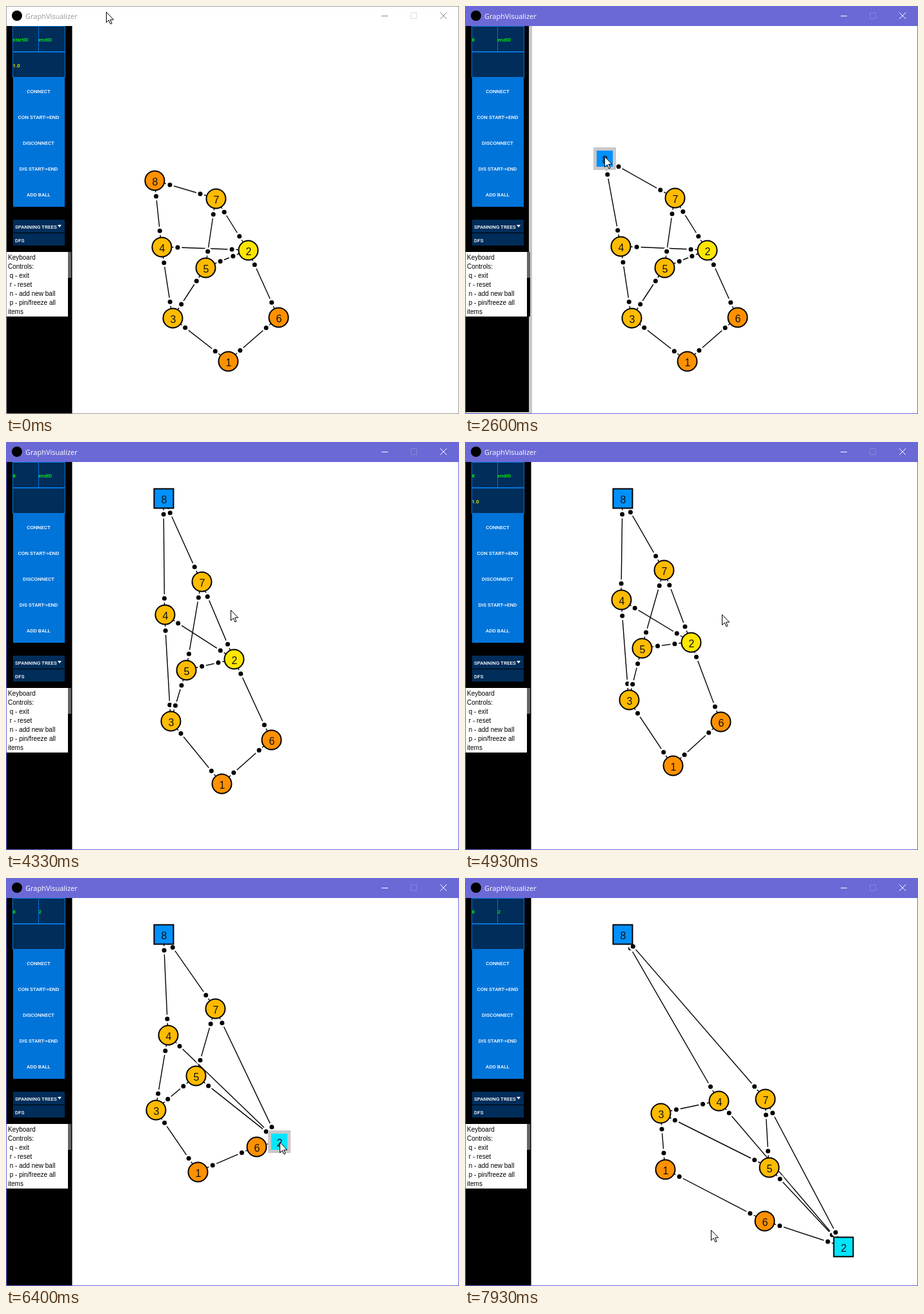
Recreate the animation shown at these times as an HTML page. Size 702x632 px, loop 8000 ms.

```html
<!DOCTYPE html>
<html lang="en">
<head>
<meta charset="utf-8">
<title>GraphVisualizer</title>
<style>
  html, body { margin: 0; width: 100%; height: 100%; overflow: hidden; background: #fff; }
  svg { display: block; width: 702px; height: 632px; }
  #frame { fill: #fff; stroke: #a0a0a0; }
  #bar { fill: #fff; }
  #title { font: 11px "Open Sans", sans-serif; fill: #999; }
  #buttons path { fill: none; stroke: #8a8a8a; }
  #buttons .off { stroke: #dcdcdc; }
  .active #frame { stroke: #6b69d6; }
  .active #bar { fill: #6b69d6; }
  .active #title { fill: #fff; }
  .active #buttons path { stroke: #fff; }
  .active #buttons .off { stroke: #8886d4; }
  .dark { fill: #002d5a; }
  .blue { fill: #0074d9; }
  .field { fill: #002d5a; stroke: #0074d9; }
  #ui text { font: 500 8px Roboto, sans-serif; fill: #fff; }
  #ui .green { fill: #0f0; }
  #ui .yellow { fill: #ff0; }
  #ui .mid { text-anchor: middle; }
  #ui .help { font: 10px "Liberation Sans", Arial, sans-serif; fill: #000; white-space: pre; }
  #nodes text { font: 16px "Liberation Sans", Arial, sans-serif; text-anchor: middle; fill: #111; }
  #edges line { stroke: #000; stroke-width: 1.4; }
</style>
</head>
<body>
<svg id="stage" viewBox="0 0 702 632">
  <rect id="frame" x=".5" y=".5" width="701" height="631"/>
  <rect id="bar" x="1" y="1" width="700" height="30"/>
  <circle cx="17" cy="15" r="8"/>
  <text id="title" x="30" y="19.5">GraphVisualizer</text>
  <g id="buttons">
    <path d="M582 15.5h10"/>
    <path class="off" d="M627.5 10.5h9v9h-9z"/>
    <path d="M673 10l10 10M683 10l-10 10"/>
  </g>

  <g id="ui">
    <rect x="1" y="31" width="101.5" height="600"/>
    <g id="outline" fill="#c8c8c8">
      <rect x="99" y="31" width="5" height="600"/>
      <rect x="1" y="629" width="103" height="2"/>
    </g>
    <rect class="field" x="10.5" y="31.5" width="40" height="39"/>
    <rect class="field" x="50.5" y="31.5" width="41" height="39"/>
    <rect class="field" x="10.5" y="71.5" width="81" height="39"/>
    <text id="start" class="green" x="10.5" y="55"></text>
    <text id="end" class="green" x="50.5" y="55"></text>
    <text id="weight" class="yellow" x="10.5" y="95">1.0</text>
    <rect class="blue" x="11" y="111" width="80" height="200"/>
    <rect class="dark" x="11" y="331" width="80" height="20"/>
    <rect class="dark" x="11" y="352" width="80" height="19"/>
    <text x="14" y="345">SPANNING TREES</text>
    <path d="M80 339h6l-3 4z" fill="#fff"/>
    <text x="14" y="366">DFS</text>
    <rect x="1" y="381" width="95" height="100" fill="#fff"/>
    <rect x="96" y="381" width="5" height="100"/>
    <rect x="96" y="381" width="5" height="40" fill="#646464"/>
  </g>

  <g id="edges"></g>
  <g id="nodes"></g>
  <path id="cursor" d="M.5 .5v16l3.7-3.6 2.7 6 2.2-1-2.6-5.8h5.2z" fill="#fff" stroke="#000"/>
</svg>

<script>
const LOOP = 8000, FPS = 15;
const FOCUS = 1600, GRAB_8 = 2330, DROP_8 = 3830, GRAB_2 = 5700, DROP_2 = 7660;
const WAKE = 2560, TURN = 5530, FINISH = 7930;
const $ = id => document.getElementById(id);

function set(el, attrs) {
  for (const k in attrs) el.setAttribute(k, attrs[k]);
  return el;
}
function add(parent, tag, attrs, text) {
  const el = set(document.createElementNS("http://www.w3.org/2000/svg", tag), attrs);
  if (text) el.textContent = text;
  return parent.appendChild(el);
}
const move = (el, [x, y]) => set(el, { transform: `translate(${x} ${y})` });
const show = (el, on) => set(el, { visibility: on ? "visible" : "hidden" });

["CONNECT", "CON START->END", "DISCONNECT", "DIS START->END", "ADD BALL"].forEach((label, i) =>
  add($("ui"), "text", { class: "mid", x: 50.5, y: 134.5 + 40 * i }, label));
["Keyboard", "Controls:", " q - exit", " r - reset", " n - add new ball", " p - pin/freeze all", "items"].forEach((line, i) =>
  add($("ui"), "text", { class: "help", x: 3, y: 393 + 14 * i }, line));

const links = ["31", "42", "43", "52", "53", "61", "62", "72", "75", "84", "87"];
const neighbours = id => links.filter(l => l.includes(id)).map(l => l.replace(id, ""));
function hops(from, to) {
  let reached = [from], n = 0;
  for (; !reached.includes(to); n++) reached = reached.flatMap(id => [id, ...neighbours(id)]);
  return n;
}

// A leg runs along a quadratic curve [from, bend, to]; between legs things rest.
const smooth = u => u * u * (3 - 2 * u);
const leg = (start, end, curve, ease = smooth) => ({ start, end, curve, ease });
function along(legs, t) {
  const { start, end, curve: [a, b, c], ease } = legs.findLast(l => l.start <= t) || legs[0];
  const s = ease(Math.min(1, Math.max(0, (t - start) / (end - start))));
  return [0, 1].map(i => (1 - s) ** 2 * a[i] + 2 * s * (1 - s) * b[i] + s * s * c[i]);
}

// The pull of a dragged node arrives later the more links away it is.
const followFirst = id => u => smooth(u ** (.12 + .6 * hops("8", id)));
const followSecond = id => u => u ** (2.7 / hops("2", id));
const free = (id, a, b, c, d, e) => [
  leg(WAKE, TURN, [a, b, c], followFirst(id)),
  leg(TURN, FINISH, [c, d, e], followSecond(id))
];
const routes = {
  1: free("1", [344, 550], [328, 516], [313, 482], [272, 416], [310, 451]),
  2: [
    leg(WAKE, TURN, [[375, 378], [344, 337], [351, 296]], followFirst("2")),
    leg(GRAB_2, 7470, [[351, 296], [439, 468], [618, 586]]),
    leg(7470, 7600, [[618, 586], [602, 578], [586, 571]])
  ],
  3: free("3", [258, 483], [255, 433], [253, 383], [188, 322], [303, 364]),
  4: free("4", [241, 373], [256, 304], [240, 236], [326, 291], [393, 345]),
  5: free("5", [309, 405], [267, 354], [275, 302], [426, 333], [471, 448]),
  6: free("6", [422, 482], [404, 448], [386, 414], [403, 424], [464, 531]),
  7: free("7", [325, 298], [285, 245], [311, 192], [414, 269], [465, 342]),
  8: [leg(2270, 3600, [[230, 270], [176, 158], [244, 87]])]
};

const pointer = [
  leg(0, 1130, [[155, 9], [350, 130], [233, 268]]),
  leg(DROP_8, 4330, [[244, 84], [270, 150], [348, 260]]),
  leg(4330, GRAB_2, [[348, 260], [451, 262], [352, 295]]),
  leg(DROP_2, FINISH, [[587, 572], [484, 558], [381, 545]])
];
function pointerAt(t) {
  const held = (id, dx, dy) => {
    const [x, y] = along(routes[id], t);
    return [x + dx, y + dy];
  };
  if (t >= GRAB_8 && t < DROP_8) return held(8, 0, -3);
  if (t >= GRAB_2 && t < DROP_2) return held(2, 1, 1);
  return along(pointer, t);
}

const edges = links.map(([a, b]) => {
  const g = add($("edges"), "g");
  const line = add(g, "line");
  const dots = [a, b].map(() => {
    const dot = add(g, "g");
    add(dot, "circle", { r: 6.5, fill: "#fff" });
    add(dot, "circle", { r: 3.5 });
    return dot;
  });
  return { a, b, line, dots };
});

// Colour follows the number of links; pinned nodes take the swapped hue.
const warm = { 2: "#ff9100", 3: "#ffbb00", 4: "#ffe600" };
const cold = { 2: "#0091ff", 4: "#00e6ff" };
const pinTime = { 8: GRAB_8, 2: GRAB_2 };
const nodes = Object.keys(routes).map(id => {
  const g = add($("nodes"), "g");
  const shape = add(g, "rect", { x: -15, y: -15, width: 30, height: 30 });
  add(g, "text", { x: .5, y: 7.5 }, id);
  return { id, g, shape, degree: neighbours(id).length };
});

function draw(t) {
  const [mx, my] = pointerAt(t);
  const pos = {};
  for (const id in routes) pos[id] = along(routes[id], t);

  for (const { a, b, line, dots } of edges) {
    const [x1, y1] = pos[a], [x2, y2] = pos[b];
    const len = Math.hypot(x2 - x1, y2 - y1);
    const dx = 25 * (x2 - x1) / len, dy = 25 * (y2 - y1) / len;
    set(line, { x1, y1, x2, y2 });
    move(dots[0], [x1 + dx, y1 + dy]);
    move(dots[1], [x2 - dx, y2 - dy]);
  }

  for (const { id, g, shape, degree } of nodes) {
    const [x, y] = pos[id];
    const hover = Math.hypot(mx - x, my - y) < 17;
    const pinned = t >= pinTime[id];
    move(g, [Math.round(x) + .5, Math.round(y) + .5]);
    set(shape, {
      rx: pinned ? 0 : 15,
      fill: (pinned ? cold : warm)[degree],
      stroke: hover ? "#c8c8c8" : "#000",
      "stroke-width": hover ? 5 : 2
    });
    if (id === "8") show($("outline"), hover);
  }

  move($("cursor"), [Math.round(mx), Math.round(my)]);
  show($("weight"), t < GRAB_8 || (t >= 4600 && t < GRAB_2));
  $("start").textContent = t < GRAB_8 ? "startID" : "8";
  $("end").textContent = t < GRAB_2 + 100 ? "endID" : "2";
  $("stage").classList.toggle("active", t >= FOCUS);
}

// The picture advances in steps, on times rounded to 10 ms.
function tick() {
  const step = Math.floor((performance.now() % LOOP + 4) * FPS / 1000) % (LOOP * FPS / 1000);
  draw(Math.round(step * 100 / FPS) * 10);
  requestAnimationFrame(tick);
}
tick();
</script>
</body>
</html>
```
